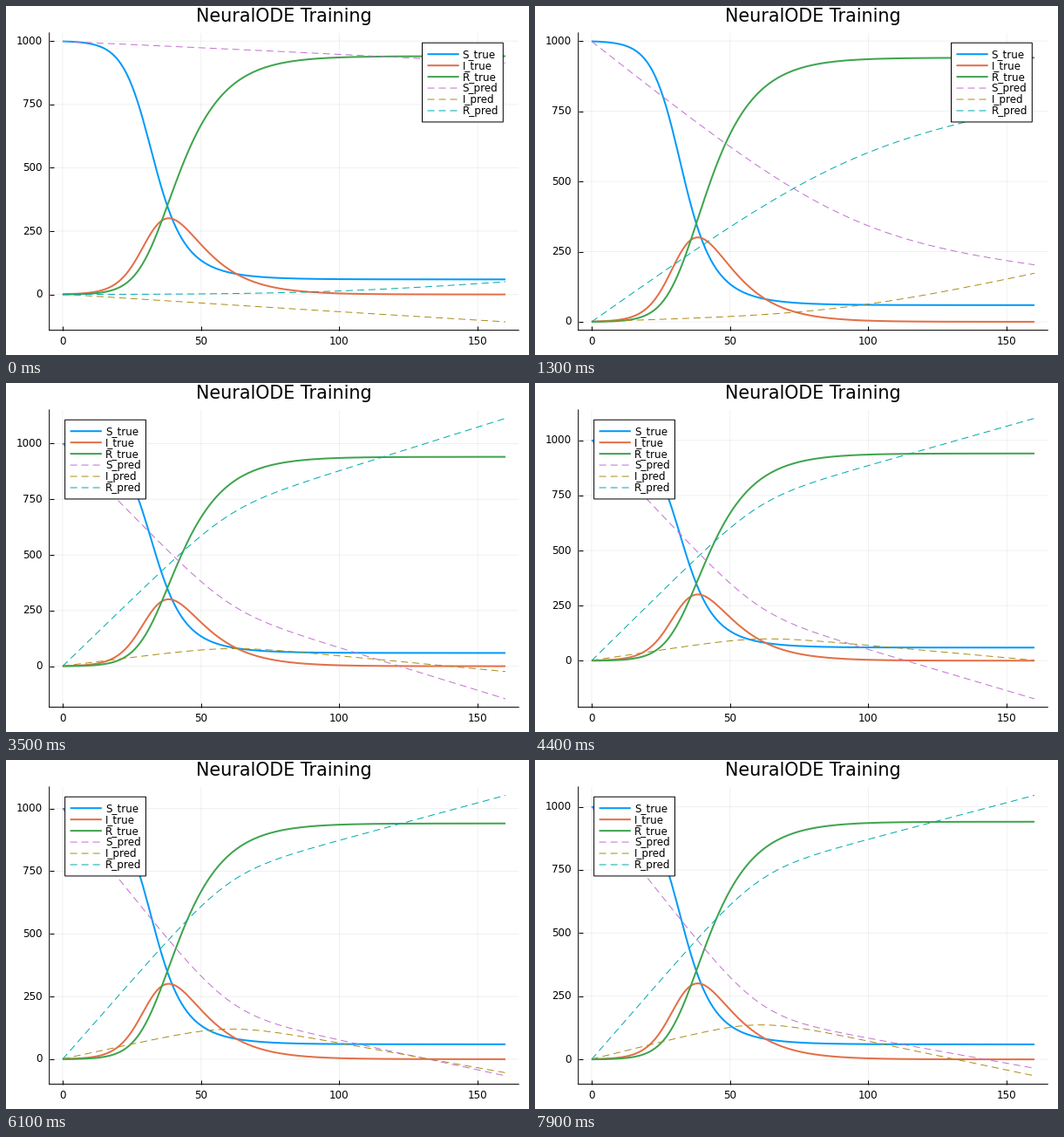
A matplotlib script that plays this animation: 600 px wide and 400 px high, repeating every 8000 ms.

```python
import numpy as np
import matplotlib.pyplot as plt
from matplotlib.animation import FuncAnimation
from matplotlib.patches import Rectangle

W, H, DPI = 600, 400, 100
PX = 72 / DPI  # points per pixel
LEFT, RIGHT, TOP, BOTTOM = 49.7, 588.2, 30.87, 371.6
FRAMES, INTERVAL = 80, 100
HOLD = 2          # extra ticks on the first epoch
LEGEND_SWAP = 16  # tick at which the legend jumps to the left
DAYS = 160

plt.rcParams.update({
    "font.family": "DejaVu Sans",
    "font.size": 11.9 * PX,
    "path.snap": False,
    "lines.scale_dashes": False,
    "lines.solid_capstyle": "butt",
    "lines.dash_capstyle": "butt",
})


def solve_sir(beta=0.3, gamma=0.1, sub=4):
    """Integrate the SIR equations with RK4, one sample per day."""
    def rate(u):
        new, rec = beta * u[0] * u[1] / 1000, gamma * u[1]
        return np.array([-new, new - rec, rec])

    u, h = np.array([999.0, 1.0, 0.0]), 1 / sub
    out = [u]
    for _ in range(DAYS):
        for _ in range(sub):
            a = rate(u)
            b = rate(u + h / 2 * a)
            c = rate(u + h / 2 * b)
            d = rate(u + h * c)
            u = u + h / 6 * (a + 2 * b + 2 * c + d)
        out.append(u)
    return np.array(out).T


days = np.arange(DAYS + 1)
truth = solve_sir()

# Last-day value of each fitted curve at a few epochs
EPOCHS = [0, 11, 24, 42, 53, 66, 77]
END_S = [914, 203, -120, -173, -88, -41, -35]
END_I = [-108, 173, -50, 2, -60, -47, -65]
END_R = [50, 767, 1127, 1100, 1048, 1058, 1045]


def predict(epoch):
    """Fitted curves: a learned first slope that bends at a soft knee."""
    slopes = (-0.5 - 13.5 * (1 - np.exp(-epoch / 14)),
              3.3 - 4 * np.exp(-epoch / 40),
              12.6 * np.tanh(epoch / 17.5))
    loose = np.exp(-(epoch / 16) ** 4)
    knee, soft = 60 + 40 * loose, 8 + 17 * loose
    bend = soft * np.log1p(np.exp((days - knee) / soft))
    bend = (bend - bend[0]) / (bend[-1] - bend[0])
    curves = []
    for y0, slope, ends in zip(truth[:, 0], slopes, (END_S, END_I, END_R)):
        end = np.interp(epoch, EPOCHS, ends)
        curves.append(y0 + slope * days + (end - y0 - slope * DAYS) * bend)
    return curves


STYLES = [("S_true", "#009afa"), ("I_true", "#e36f47"), ("R_true", "#3ea44e"),
          ("S_pred", "#c371d2"), ("I_pred", "#ac8d18"), ("R_pred", "#00aaae")]


def line_style(k):
    color = STYLES[k][1]
    if k < 3:
        return dict(color=color, lw=2 * PX)
    return dict(color=color, lw=1 * PX, ls=(0, (8 * PX, 5 * PX)))


fig = plt.figure(figsize=(W / DPI, H / DPI), dpi=DPI, facecolor="white")
ax = fig.add_axes([LEFT / W, 1 - BOTTOM / H,
                   (RIGHT - LEFT) / W, (BOTTOM - TOP) / H])
ax.set_xlim(-0.03 * DAYS, 1.03 * DAYS)
ax.set_xticks([0, 50, 100, 150])
ax.set_yticks([0, 250, 500, 750, 1000])
ax.set_axisbelow(True)
ax.grid(color="black", alpha=0.06, lw=1 * PX)
for side in ("top", "right"):
    ax.spines[side].set_visible(False)
for side in ("left", "bottom"):
    ax.spines[side].set_linewidth(1 * PX)
ax.tick_params(direction="in", length=5 * PX, width=1 * PX)
ax.tick_params(axis="y", pad=8.3 * PX)
ax.tick_params(axis="x", pad=16 * PX)
for label in ax.get_xticklabels():
    label.set_va("baseline")
for label in ax.get_yticklabels():
    label.set_va("center")

lines = [ax.plot(days, truth[k % 3], **line_style(k))[0] for k in range(6)]

# Overlay in pixel coordinates for the title and legend
top = fig.add_axes([0, 0, 1, 1], zorder=5)
top.set_xlim(0, W)
top.set_ylim(H, 0)
top.axis("off")
top.text((LEFT + RIGHT) / 2, 18.5, "NeuralODE Training", fontsize=20.7 * PX,
         ha="center", va="baseline")


def make_legend(x, y=42.23, row=12.96):
    parts = [top.add_patch(Rectangle((x, y), 92.8, 7 * row, fc="white",
                                     ec="black", lw=1 * PX))]
    for k, (name, _) in enumerate(STYLES):
        mid = y + row * (k + 1)
        parts += top.plot([x + 6, x + 42.2], [mid, mid], **line_style(k))
        parts.append(top.text(x + 46.2, mid + 3.9, name, va="baseline"))
    return parts


legend_right = make_legend(477.5)
legend_left = make_legend(67.65)


def update(i):
    fits = predict(max(0, i - HOLD))
    for line, y in zip(lines[3:], fits):
        line.set_ydata(y)
    values = np.concatenate([truth.ravel(), *fits])
    lo, hi = values.min(), values.max()
    pad = 0.03 * (hi - lo)
    ax.set_ylim(lo - pad, hi + pad)
    for part in legend_right:
        part.set_visible(i < LEGEND_SWAP)
    for part in legend_left:
        part.set_visible(i >= LEGEND_SWAP)
    return lines


anim = FuncAnimation(fig, update, frames=FRAMES, interval=INTERVAL,
                     init_func=lambda: update(0), repeat=True, repeat_delay=0)
plt.show()
```
